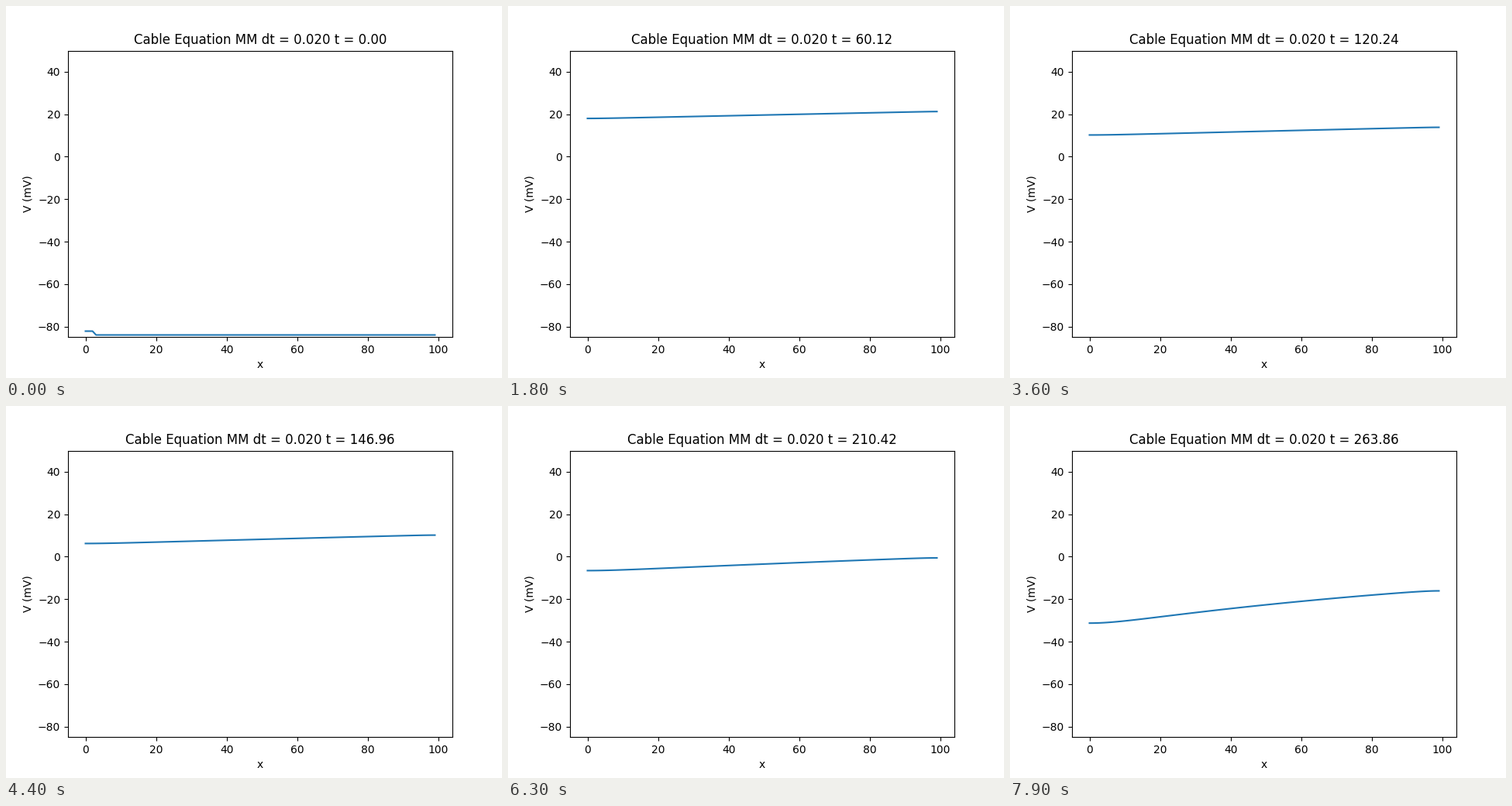
Write a matplotlib script that moves like this. It is 640 px wide and 480 px high and loops after 8000 ms.

```python
import numpy as np
import matplotlib.pyplot as plt
from matplotlib.animation import FuncAnimation

FRAMES, INTERVAL = 80, 100
STEP = 3.34            # simulated ms per frame
SPEED = 3.4            # cells per simulated ms
ONSET = 0.6            # time at which the front enters the cable
REST = -84.0
LAST = 99

x = np.arange(LAST + 1)


def potential(behind):
    """Voltage of the travelling pulse, given cells behind its front."""
    age = behind / SPEED
    plateau = 30.8 - 0.0925 * age - 1850 / (309 - age)
    spike = 17.3 * np.exp(-behind ** 2 / 215)
    u = np.clip(behind, -9, 9)
    upstroke = 1 / (1 + np.exp(-(0.175 + 1.792 * u + 0.085 * u ** 2)))
    return REST + (plateau + spike - REST) * upstroke


def spread(rate, age):
    """Diffusive width of the flat zone at a sealed end."""
    return rate * np.sqrt(max(age, 0))


def voltage(t):
    if t == 0:
        return np.where(x < 3, -82.2, REST)
    left = spread(0.62, t)
    right = spread(0.3, t - ONSET - LAST / SPEED)
    pos = np.hypot(x, left) - np.hypot(LAST - x, right) + LAST - x
    return potential(SPEED * (t - ONSET) - pos)


def title_text(t):
    return f"Cable Equation MM dt = 0.020 t = {t:.2f}"


fig, ax = plt.subplots(figsize=(6.4, 4.8), dpi=100)
line, = ax.plot(x, voltage(0))
ax.set_ylim(-85, 50)
ax.set_xlabel("x")
ax.set_ylabel("V (mV)")
title = ax.set_title(title_text(0))


def update(i):
    t = i * STEP
    line.set_ydata(voltage(t))
    title.set_text(title_text(t))
    return line, title


anim = FuncAnimation(fig, update, frames=FRAMES, interval=INTERVAL,
                     repeat=True, repeat_delay=0)
plt.show()
```
